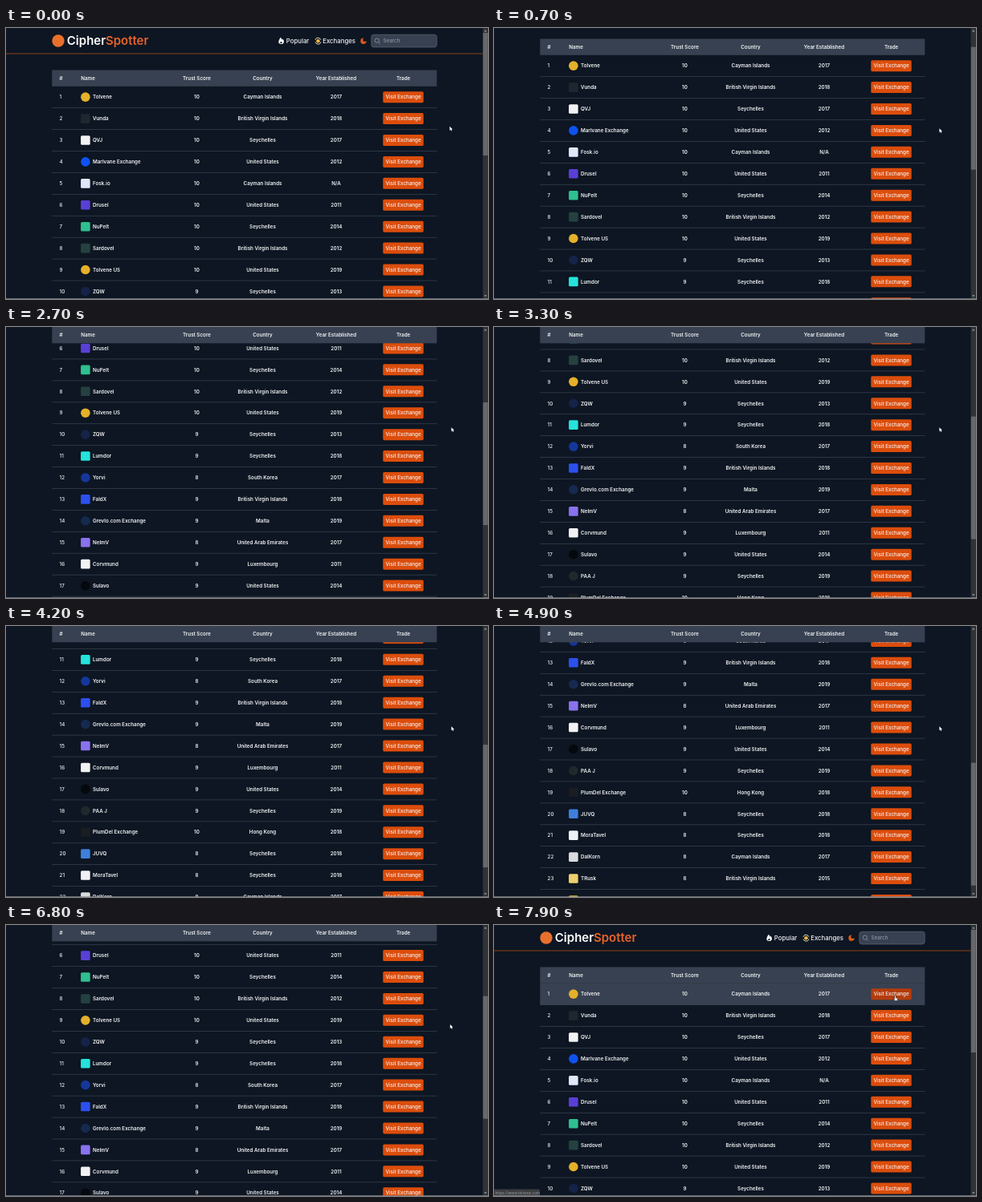
Write an HTML page with a canvas that moves like this. It is 600 by 338 pixels and loops after 8 s.

```html
<!DOCTYPE html>
<html lang="en">
<head>
<meta charset="utf-8">
<title>Exchanges</title>
<style>
html, body { margin: 0; width: 100%; height: 100%; overflow: hidden; background: #0d1622; }
canvas { display: block; width: 600px; height: 338px; }
</style>
</head>
<body>
<canvas id="stage"></canvas>
<script>
const W = 600, H = 338, LOOP = 8000;
const ROW_H = 26.92, TABLE_X = 57.3, TABLE_W = 479, HEAD_Y = 52.5, HEAD_H = 20.3;
const FIRST_ROW = HEAD_Y + HEAD_H;
const BG = '#0d1622', PANEL = '#374151', ORANGE = '#dc4d0c', ORANGE_DARK = '#b53c0c', WHITE = '#f3f4f6';
const CAY = 'Cayman Islands', BVI = 'British Virgin Islands', SEY = 'Seychelles', USA = 'United States';

// name, score, country, year, badge colour, badge shape
const rows = [
  ['Tolvene', 10, CAY, '2017', '#e5b02a', 'o'],
  ['Vunda', 10, BVI, '2018', '#20262f', 's'],
  ['QVJ', 10, SEY, '2017', '#f2f2f2', 's'],
  ['Marlvane Exchange', 10, USA, '2012', '#1052f0', 'o'],
  ['Fosk.io', 10, CAY, 'N/A', '#dfe7fb', 's'],
  ['Drusel', 10, USA, '2011', '#5a3fd6', 's'],
  ['NuPelt', 10, SEY, '2014', '#2fc08f', 's'],
  ['Sardovel', 10, BVI, '2012', '#25413f', 's'],
  ['Tolvene US', 10, USA, '2019', '#e5b02a', 'o'],
  ['ZQW', 9, SEY, '2013', '#152348', 'o'],
  ['Lumdor', 9, SEY, '2018', '#25e3dc', 's'],
  ['Yorvi', 8, 'South Korea', '2017', '#15379c', 'o'],
  ['FaldX', 9, BVI, '2018', '#2c50ee', 's'],
  ['Grevlo.com Exchange', 9, 'Malta', '2019', '#16294f', 'o'],
  ['NelmV', 8, 'United Arab Emirates', '2017', '#8a72ee', 's'],
  ['Corvmund', 9, 'Luxembourg', '2011', '#f2f2f2', 's'],
  ['Sulavo', 9, USA, '2014', '#05080c', 'o'],
  ['PAA J', 9, SEY, '2019', '#20282c', 'o'],
  ['PlumDel Exchange', 10, 'Hong Kong', '2018', '#1a1d21', 's'],
  ['JUVQ', 8, SEY, '2018', '#3f7fdc', 's'],
  ['MoraTavel', 8, SEY, '2018', '#eef2f7', 's'],
  ['DalKorn', 8, CAY, '2017', '#d9dbdc', 's'],
  ['TRusk', 8, BVI, '2015', '#efd06c', 's'],
  ['GlaunDEK', 8, 'Lithuania', '2018', '#efbd45', 's']
];

// wheel ticks: start time, resulting scroll position
const ticks = [
  [250, 39], [850, 78.1], [1350, 117.3], [1980, 156], [2480, 195], [2930, 233.2],
  [3380, 273], [3800, 313.5], [4300, 352], [4800, 381.8],
  [6450, 240], [6700, 90], [6930, 0]
];
// pointer: time, x, y
const path = [
  [0, 552.3, 122.8], [200, 552.3, 122.8], [600, 554.4, 125.2], [6750, 554.4, 125.2],
  [7180, 514, 95.5], [7500, 499.3, 88], [8000, 499.3, 88]
];

const canvas = document.getElementById('stage');
const ctx = canvas.getContext('2d');
const ratio = window.devicePixelRatio || 1;
canvas.width = W * ratio;
canvas.height = H * ratio;

const clamp = v => Math.max(0, Math.min(1, v));
const ease = v => v * v * (3 - 2 * v);
const mix = (a, b, k) => a + (b - a) * k;

function scrollAt(t) {
  let y = 0;
  for (const [start, to] of ticks) y = mix(y, to, ease(clamp((t - start) / 240)));
  return y;
}

function pointerAt(t) {
  let i = 0;
  while (i < path.length - 2 && t >= path[i + 1][0]) i++;
  const [t0, x0, y0] = path[i], [t1, x1, y1] = path[i + 1];
  const k = ease(clamp((t - t0) / (t1 - t0)));
  return { x: mix(x0, x1, k), y: mix(y0, y1, k) };
}

function rect(x, y, w, h, color) {
  ctx.fillStyle = color;
  ctx.fillRect(x, y, w, h);
}

function box(x, y, w, h, r, color, line) {
  ctx.beginPath();
  ctx.roundRect(x, y, w, h, r);
  ctx.fillStyle = color;
  ctx.fill();
  if (line) {
    ctx.strokeStyle = line;
    ctx.lineWidth = 0.7;
    ctx.stroke();
  }
}

function dot(x, y, r, color) {
  ctx.beginPath();
  ctx.arc(x, y, r, 0, Math.PI * 2);
  ctx.fillStyle = color;
  ctx.fill();
}

// y is the middle of the capitals
function text(str, x, y, align = 'left', size = 6.25, weight = 600, color = WHITE) {
  ctx.font = `${weight} ${size}px Inter, sans-serif`;
  ctx.textAlign = align;
  ctx.fillStyle = color;
  ctx.fillText(str, x, y + size * 0.364);
}

function poly(points, color) {
  ctx.beginPath();
  for (const [x, y] of points) ctx.lineTo(x, y);
  ctx.closePath();
  ctx.fillStyle = color;
  ctx.fill();
}

function flame(x, y) {
  ctx.beginPath();
  ctx.moveTo(x - 0.6, y - 4.2);
  ctx.bezierCurveTo(x + 0.6, y - 2.6, x + 1, y - 2, x + 1.3, y - 1.2);
  ctx.lineTo(x + 2.1, y - 2.3);
  ctx.bezierCurveTo(x + 4.2, y + 0.4, x + 4, y + 4, x, y + 4);
  ctx.bezierCurveTo(x - 4.2, y + 4, x - 4, y + 0.2, x - 0.6, y - 4.2);
  ctx.fillStyle = '#fff';
  ctx.fill();
  dot(x, y + 2.1, 1.2, BG);
}

function coin(x, y) {
  dot(x, y, 2.3, '#f0b440');
  ctx.strokeStyle = '#e8dcc0';
  ctx.lineWidth = 1;
  for (const a of [0.35, 0.35 + Math.PI]) {
    ctx.beginPath();
    ctx.arc(x, y, 3.8, a, a + 2.4);
    ctx.stroke();
  }
}

function moon(x, y) {
  ctx.beginPath();
  ctx.arc(x, y, 3.7, -0.05, Math.PI * 1.5 + 0.1);
  ctx.bezierCurveTo(x - 2.2, y - 1, x + 0.6, y + 2.2, x + 3.7, y - 0.2);
  ctx.closePath();
  ctx.fillStyle = '#dc5a17';
  ctx.fill();
}

function nav() {
  dot(65, 16, 7.7, '#e8702d');
  text('Cipher', 75.8, 16, 'left', 15, 600, '#fff');
  text('Spotter', 124, 16, 'left', 15, 600, '#e8622a');
  flame(342.5, 16);
  text('Popular', 348.8, 16.2, 'left', 7.8, 500);
  coin(388.5, 16.2);
  text('Exchanges', 394.2, 16.2, 'left', 7.8, 500);
  moon(445, 16.3);
  box(454.8, 8.3, 81.4, 15.6, 3, PANEL, '#5d6878');
  ctx.strokeStyle = '#9ca3af';
  ctx.lineWidth = 0.7;
  ctx.beginPath();
  ctx.arc(461.8, 15.6, 2.6, 0, Math.PI * 2);
  ctx.moveTo(463.7, 17.5);
  ctx.lineTo(466, 19.8);
  ctx.stroke();
  text('Search', 469.6, 16.1, 'left', 6.25, 400, '#9ca3af');
  rect(0, 31.6, 594, 0.8, '#b24a14');
}

function badge(y, color, shape) {
  if (shape === 'o') dot(98.9, y, 5.8, color);
  else box(93.1, y - 5.8, 11.6, 11.6, 1.5, color);
}

function tableRow(row, i, top, hovered, pressed) {
  const [name, score, country, year, color, shape] = row;
  const y = top + ROW_H / 2 - 0.1;
  if (hovered) rect(TABLE_X, top, TABLE_W, ROW_H, PANEL);
  rect(TABLE_X, top + ROW_H - 0.4, TABLE_W, 0.7, '#3a4452');
  text(i + 1, 66.6, y, 'left', 6.25, 500);
  badge(y, color, shape);
  text(name, 108, y);
  text(score, 237.5, y, 'center');
  text(country, 319.5, y, 'center');
  text(year, 411, y, 'center');
  box(469.3, y - 7, 50.4, 14, 1.6, pressed ? ORANGE_DARK : ORANGE);
  text('Visit Exchange', 494.6, y, 'center', 6.25, 500);
}

function tableHead(top) {
  rect(TABLE_X, top, TABLE_W, HEAD_H, PANEL);
  const y = top + HEAD_H / 2;
  text('#', 66.6, y);
  text('Name', 93.2, y);
  text('Trust Score', 237.5, y, 'center');
  text('Country', 319.5, y, 'center');
  text('Year Established', 411, y, 'center');
  text('Trade', 494.6, y, 'center');
}

function scrollbar(scroll) {
  rect(593.6, 0, 6.4, H, '#303236');
  rect(593.8, 6 + scroll * 0.453, 6, 153, '#66686b');
  poly([[595.1, 4.4], [598.5, 4.4], [596.8, 2.4]], '#a4a6a8');
  poly([[595.1, 333.2], [598.5, 333.2], [596.8, 335.2]], '#a4a6a8');
}

function arrow(x, y) {
  poly([[x, y], [x, y + 5], [x + 1.2, y + 4], [x + 2, y + 5.7], [x + 2.9, y + 5.2],
    [x + 2.1, y + 3.6], [x + 3.6, y + 3.5]], '#fff');
}

function hand(x, y) {
  box(x - 0.5, y, 1.3, 4.5, 0.6, '#fff', '#222');
  box(x - 1.2, y + 2.8, 4.4, 3.8, 1.2, '#fff', '#222');
  rect(x - 0.2, y + 0.6, 0.8, 4, '#fff');
}

function draw(t) {
  const scroll = scrollAt(t), p = pointerAt(t);
  const inTable = p.x < TABLE_X + TABLE_W;
  let onLink = false;

  ctx.setTransform(ratio, 0, 0, ratio, 0, 0);
  rect(0, 0, W, H, BG);

  ctx.save();
  ctx.translate(0, -scroll);
  nav();
  ctx.restore();

  rows.forEach((row, i) => {
    const top = FIRST_ROW + i * ROW_H - scroll;
    if (top < -ROW_H || top > H) return;
    const hovered = inTable && p.y >= top && p.y < top + ROW_H;
    const pressed = hovered && p.x > 469 && p.x < 520 && Math.abs(p.y - top - ROW_H / 2) < 7;
    onLink = onLink || pressed;
    tableRow(row, i, top, hovered, pressed);
  });
  tableHead(Math.max(0, HEAD_Y - scroll));
  scrollbar(scroll);

  if (onLink) {
    box(-2, 329.6, 59, 10, 1.5, '#3b3d40');
    text('https://www.tolvene.com', 1.6, 333.8, 'left', 4.7, 400, '#9a9c9f');
  }
  rect(0, 337.3, W, 0.7, '#8b9096');
  if (onLink) hand(p.x, p.y);
  else arrow(p.x, p.y);
}

function frame() {
  draw(performance.now() % LOOP);
  requestAnimationFrame(frame);
}
frame();
</script>
</body>
</html>
```
